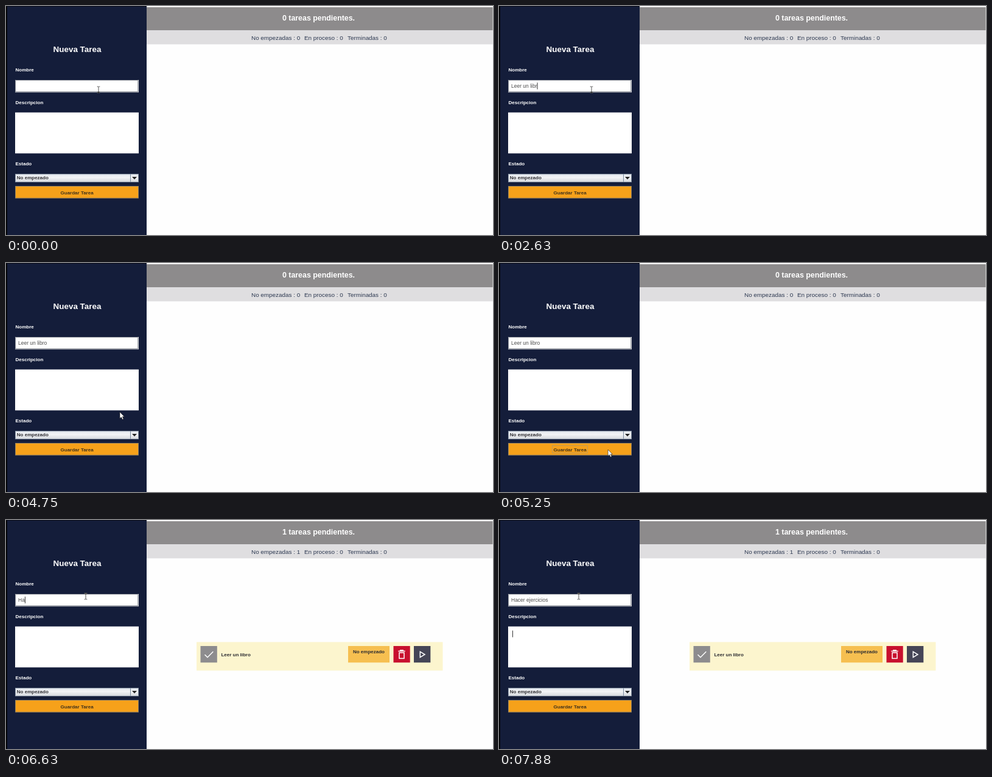
Recreate the animation shown at these times as an HTML page. Size 800 by 378 pixels, loop 8 s.

```html
<!DOCTYPE html>
<html lang="es">
<head>
<meta charset="utf-8">
<title>Nueva Tarea</title>
<style>
  html, body { margin: 0; width: 100%; height: 100%; overflow: hidden; background: #fff; }
  svg { display: block; width: 100vw; height: 100vh; }
  text { font-family: "Liberation Sans", Arial, sans-serif; font-size: 8px; font-weight: bold; white-space: pre; }
  .side { fill: #fff; }
  .title { font-size: 13.45px; }
  .head { font-size: 12.4px; fill: #fff; }
  .count { font-size: 9.9px; font-weight: normal; fill: #2c3850; }
  .typed { font-size: 8.5px; font-weight: normal; fill: #4c4c4c; }
  .dark { fill: #2b2b30; }
  .line { fill: none; stroke: #fff; stroke-width: 1.5; }
  #beam { fill: none; stroke: #aaa; mix-blend-mode: difference; }
</style>
</head>
<body>
<svg viewBox="0 0 800 378">
  <defs>
    <linearGradient id="metal" x2="0" y2="1">
      <stop offset="0" stop-color="#dde3ea"/>
      <stop offset=".4" stop-color="#f3f4f6"/>
      <stop offset="1" stop-color="#d5d8dd"/>
    </linearGradient>
  </defs>
  <rect width="800" height="378" fill="#fefefe"/>

  <rect width="231" height="378" fill="#141d3a"/>
  <rect width="2" height="378" fill="#030408"/>
  <rect width="231" height="1" fill="#080b16"/>
  <rect x="231" y="2" width="568.5" height="38" fill="#8d8b8c"/>
  <rect x="231" y="40" width="568.5" height="23.3" fill="#dfdee0"/>
  <text class="head" id="pending" x="513.5" y="24.3" text-anchor="middle"></text>
  <text class="count" id="todo" x="403" y="56"></text>
  <text class="count" x="490" y="56">En proceso : 0</text>
  <text class="count" x="561" y="56">Terminadas : 0</text>

  <text class="side title" x="117" y="76" text-anchor="middle">Nueva Tarea</text>
  <text class="side" x="15.5" y="108.4">Nombre</text>
  <text class="side" x="15.5" y="162.4">Descripcion</text>
  <text class="side" x="15.5" y="263.4">Estado</text>

  <rect x="15" y="122" width="203" height="20.5" fill="#fff"/>
  <path d="M15.5 142V122.5H217" fill="none" stroke="#80858f"/>
  <path d="M15 141.7H216.7V122" fill="none" stroke="#8b8f98" stroke-width="1.2"/>
  <rect x="15" y="175.7" width="203" height="67.6" fill="#fff"/>

  <rect x="15.5" y="277.5" width="202" height="13" fill="url(#metal)" stroke="#8a95a5"/>
  <path d="M204.5 277V291" stroke="#7a8a9e"/>
  <path d="M207 282H215L211 286.3Z" fill="#222"/>
  <text class="dark" x="17.8" y="286.4">No empezado</text>

  <rect x="15.5" y="297.5" width="202" height="19.6" fill="#f6a11a" stroke="#8f7f62"/>
  <text x="116.6" y="310.6" text-anchor="middle" fill="#42331c">Guardar Tarea</text>
  <rect id="ring" x="87.5" y="301.5" width="58" height="12" fill="none" stroke="#b39a66" stroke-width=".8"/>

  <g id="card">
    <rect x="313" y="201.5" width="404.5" height="47" fill="#fcf5ce"/>
    <rect x="319.5" y="208" width="27.3" height="27.3" fill="#8d8c8e"/>
    <path class="line" d="M326.5 222.2L331 226.7L340.3 217.3"/>
    <text class="dark" x="353.4" y="225">Leer un libro</text>
    <rect x="562" y="208" width="68" height="27.3" fill="#f6bf50"/>
    <text class="dark" x="596" y="220.4" text-anchor="middle">No empezado</text>
    <rect x="636.5" y="208" width="27.2" height="27.3" fill="#c8102e"/>
    <path class="line" d="M644.3 216.6H655.7M647.8 216V214.9H652.2V216M646 219V228.6H654V219Z"/>
    <rect x="670" y="208" width="27.3" height="27.3" fill="#454556"/>
    <path class="line" d="M680.3 217.3V226.7L688 222Z"/>
  </g>

  <text class="typed" id="name" x="20" y="135.4"></text>
  <rect id="caret" width="1" height="11" fill="#333"/>
  <path id="beam" d="M-2.3-5H-.6L0-4.4L.6-5H2.3M0-4.5V4.5M-2.3 5H-.6L0 4.4L.6 5H2.3"/>
  <path id="arrow" d="M0 0V10.6L2.4 8.4L4.2 12.3L6 11.5L4.3 7.7H7.4Z" fill="#fff" stroke="#1a1a1a" stroke-width=".6"/>
</svg>
<script>
const LOOP = 8000, STEP = 125, BLINK = 4;
const $ = id => document.getElementById(id);
const show = (id, on) => $(id).setAttribute('visibility', on ? 'visible' : 'hidden');

// All times below are in steps of 125 ms.
const SAVED = 44;
const first = { text: 'Leer un libro', keys: [6, 7, 8, 9, 10, 11, 12, 13, 15, 17, 19, 21, 23] };
const second = { text: 'Hacer ejercicios' };
second.keys = [...second.text].map((_, i) => i ? 53 + (i - 1) * 0.55 : 52);

const focus = [[1, 'name'], [26, 'desc'], [42, 'save'], [49, 'name'], [61, 'desc']];
const path = [
  [36, 152, 138], [37, 170, 192], [38, 187, 246], [39, 188, 284],
  [40, 181, 304], [43, 178, 310], [45, 174, 306], [47, 155, 240], [50, 131, 126]
];

function pointer(k) {
  const i = path.findIndex(p => p[0] > k);
  if (i === 0) return path[0].slice(1);
  if (i < 0) return path[path.length - 1].slice(1);
  const [a, x, y] = path[i - 1], [b, u, v] = path[i], f = (k - a) / (b - a);
  return [x + (u - x) * f, y + (v - y) * f];
}

function draw(ms) {
  const k = Math.floor(ms % LOOP / STEP);
  const saved = k >= SAVED;
  const entry = saved ? second : first;
  const pressed = entry.keys.filter(t => t <= k);
  $('name').textContent = entry.text.slice(0, pressed.length);

  const [since, where] = focus.filter(f => f[0] <= k).pop() || focus[0];
  const last = Math.max(since, ...pressed);
  const lit = Math.floor((k - last) / BLINK) % 2 === 0;
  const inName = where === 'name';
  show('caret', lit && where !== 'save');
  $('caret').setAttribute('x', inName ? 20 + $('name').getComputedTextLength() : 22);
  $('caret').setAttribute('y', inName ? 126.5 : 182.5);
  show('ring', where === 'save');

  const n = saved ? 1 : 0;
  $('pending').textContent = n + ' tareas pendientes.';
  $('todo').textContent = 'No empezadas : ' + n;
  show('card', saved);

  const [x, y] = pointer(k);
  const overText = (y > 122 && y < 143) || (y > 175 && y < 243);
  for (const id of ['beam', 'arrow']) {
    $(id).setAttribute('transform', `translate(${x} ${y})`);
    show(id, k !== SAVED && overText === (id === 'beam'));
  }
}

const start = performance.now();
function tick() {
  draw(performance.now() - start);
  requestAnimationFrame(tick);
}
tick();
</script>
</body>
</html>
```
